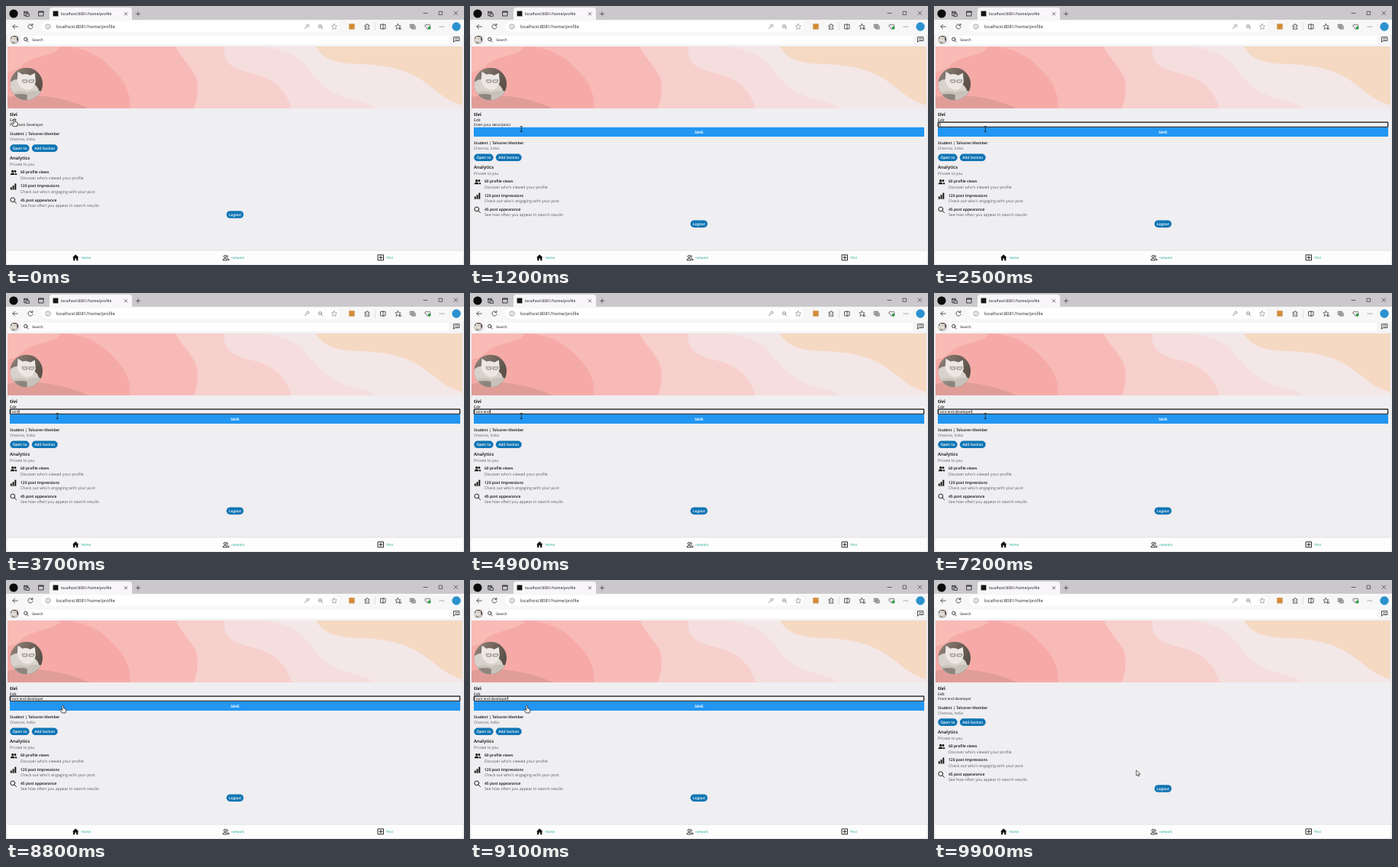
Write an HTML page with a canvas that moves like this. It is 600 by 339 pixels and loops after 10 s.

```html
<!DOCTYPE html>
<html lang="en">
<head>
<meta charset="utf-8">
<title>Profile page</title>
<style>
html, body { margin: 0; width: 100%; height: 100%; overflow: hidden; background: #e9e9ec; }
canvas, svg { position: absolute; left: 0; top: 0; width: 600px; height: 339px; }
text { font-family: "Open Sans", "Noto Sans", sans-serif; white-space: pre; text-rendering: geometricPrecision; }
</style>
</head>
<body>
<canvas id="stage"></canvas>
<svg id="over" viewBox="0 0 600 339"></svg>
<script>
const LOOP = 10000, SHIFT = 12.2;
const EDIT_AT = 500, FOCUS_AT = 1500, SAVE_AT = 9150;
const TYPED = "Front end developer";
const INK = "#0c0c0c", GREY = "#5c5c60", BLUE = "#0f75b4", PAGE = "#efeef1";

const canvas = document.getElementById("stage");
const svg = document.getElementById("over");
const ctx = canvas.getContext("2d");
const dpr = window.devicePixelRatio || 1;
canvas.width = 600 * dpr;
canvas.height = 339 * dpr;

// ---------- drawing helpers ----------
function rect(x, y, w, h, fill, r = 0) {
  ctx.beginPath();
  ctx.roundRect(x, y, w, h, r);
  ctx.fillStyle = fill;
  ctx.fill();
}
function disc(x, y, r, fill) {
  ctx.beginPath();
  ctx.arc(x, y, r, 0, 7);
  ctx.fillStyle = fill;
  ctx.fill();
}
function shape(d, fill) {
  ctx.fillStyle = fill;
  ctx.fill(new Path2D(d));
}
function line(x, y, d, w = 0.8, color = "#333") {
  ctx.save();
  ctx.translate(x, y);
  ctx.lineWidth = w;
  ctx.lineCap = ctx.lineJoin = "round";
  ctx.strokeStyle = color;
  ctx.stroke(new Path2D(d));
  ctx.restore();
}
function node(tag, attrs, parent = svg) {
  const el = document.createElementNS("http://www.w3.org/2000/svg", tag);
  for (const k in attrs) el.setAttribute(k, attrs[k]);
  parent.appendChild(el);
  return el;
}
function label(parent, x, y, str, size, fill = INK, weight = 400, anchor = "start") {
  const el = node("text", { x, y, fill, "font-size": size, "font-weight": weight, "text-anchor": anchor }, parent);
  el.textContent = str;
  return el;
}

// ---------- browser frame ----------
const STAR = "M0-3.6L1.1-1.2 3.6-1 1.7.8 2.3 3.4 0 2-2.3 3.4-1.7.8-3.6-1-1.1-1.2Z";
const LENS = "M1.8-.4a2.2 2.2 0 1 1-4.4 0a2.2 2.2 0 1 1 4.4 0M1.2 1.2L3.2 3.2";

function drawBrowser() {
  rect(0, 0, 600, 339, "#e9e9ec");
  rect(0, 0, 600, 18, "#cbc8cc");
  rect(0, 18, 600, 19, "#f7f7f8");
  rect(57, 2, 108, 17, "#f8f6f9", [4, 4, 0, 0]);
  rect(46, 20, 391, 13.5, "#fff", 6.5);

  disc(10, 10, 5.6, "#0b0b0c");
  line(27, 10, "M-3.2-2.6H1.6V0M-3.2-2.6V2.6H-1M-3.2-1.2H1.6M-.6.2H3.4V3.4H-.6Z", 0.9);
  line(46, 10, "M-3-3H3V3H-3Z", 0.9);
  line(46, 10, "M-3-2.3H3", 1.6);
  rect(61.6, 6.6, 6.8, 6.8, "#151515");
  line(157, 10.3, "M-1.7-1.7L1.7 1.7M1.7-1.7L-1.7 1.7", 0.7);
  line(173, 10.3, "M-2.7 0H2.7M0-2.7V2.7", 0.7);
  line(549.5, 9.5, "M-2.5 0H2.5", 0.7);
  line(569.5, 9.3, "M-2.1-2.1H2.1V2.1H-2.1Z", 0.7);
  line(589.3, 9.3, "M-2.2-2.2L2.2 2.2M2.2-2.2L-2.2 2.2", 0.7);

  line(12, 27, "M3.4 0H-3.2M-.4-2.8L-3.2 0-.4 2.8");
  line(32, 27, "M2.6-1.8A3.1 3.1 0 1 0 3.1.4M2.9-3.6V-1.5H.8");
  line(55, 27, "M3.2 0a3.2 3.2 0 1 1-6.4 0a3.2 3.2 0 1 1 6.4 0M0-.3V1.7M0-1.6V-1.5", 0.6, "#666");
  line(394, 27, "M3 -1.4a1.7 1.7 0 1 1-3.4 0a1.7 1.7 0 1 1 3.4 0M-.2 0L-2.8 2.6M-1.8 1.6L-.9 2.4", 0.65, "#777");
  line(412, 27, LENS + "M-1.5-.4H.7", 0.65, "#777");
  line(430, 27, STAR, 0.6, "#777");
  rect(449.3, 23.2, 7.4, 7.4, "#d58c3c");
  line(473, 27, "M-2.6-1.8H-.8a1.1 1.1 0 1 1 2 0H2.8V0a1.1 1.1 0 1 0 0 1.8V3.3H-2.6V1.8a1.1 1.1 0 1 0 0-1.8Z", 0.7);
  line(483.5, 27, "M0-4.5V4.5", 0.5, "#c8c8cc");
  line(494, 27, "M-3-2.8H3V2.8H-3ZM0-3.5V3.5", 0.8);
  line(513.5, 27, STAR + "M2.4 1.8H4.2M2 3.2H4.2", 0.7);
  line(533, 27, "M-3.2-2.8H1.4V1.4H-3.2ZM-1.6 3H3.2V-1M-.9-2V.6M-2.2-.7H.4", 0.7);
  line(552.5, 27, "M0 3L-3.2 0C-4.4-2-1.5-4.2 0-1.8 1.5-4.2 4.4-2 3.2 0Z", 0.8);
  disc(554.6, 28.8, 2, "#2e9b45");
  [-2.3, 0, 2.3].forEach(dx => disc(571 + dx, 27, 0.55, "#333"));
  disc(590, 27, 5.7, "#2b91cf");
}

// ---------- page ----------
function portrait(x, y, r) {
  ctx.save();
  ctx.translate(x, y);
  ctx.scale(r / 21, r / 21);
  ctx.beginPath();
  ctx.arc(0, 0, 21, 0, 7);
  ctx.clip();
  const g = ctx.createLinearGradient(-18, -16, 20, 8);
  g.addColorStop(0, "#8d8177");
  g.addColorStop(0.5, "#6d6158");
  g.addColorStop(1, "#584e47");
  rect(-21, -21, 42, 42, g);
  shape("M-21-2Q-14-8-8-5L10 0Q17 5 17 14L-21 17Z", "#d8d2cc");
  shape("M-12-4L-11-16-5-12Q0-14 5-11L11-14 12-3Q10 7 1 8-9 6-12-4Z", "#ece7e3");
  line(1, -4, "M-6-1H0V2H-5ZM3-1H9L8 2H3Z", 0.8, "#6c6460");
  shape("M-21 12Q-9 7 1 11 11 7 21 10V21H-21Z", "#c8c2bb");
  shape("M-21 15Q-8 11 1 14V21H-21Z", "#8d857c");
  ctx.restore();
}

function drawBanner() {
  ctx.save();
  ctx.beginPath();
  ctx.rect(2, 53, 596, 81);
  ctx.clip();
  rect(2, 53, 596, 81, "#f6aaa7");
  shape("M2 53H78C112 56 128 70 142 85 157 100 164 116 162 134H600V53Z", "#f8bab7");
  shape("M2 53H72C63 66 36 65 23 76 14 84 8 86 2 87Z", "#f8bbb5");
  shape("M222 53C229 68 246 82 250 97 253 110 250 122 246 134H600V53Z", "#f7cfcc");
  shape("M286 53C284 74 296 82 318 87 350 94 366 108 374 134H600V53Z", "#f5dedd");
  shape("M338 53C372 58 386 68 398 84 412 104 428 116 452 122 468 126 480 130 484 134H600V53Z", "#f4e7e8");
  shape("M406 53C415 70 434 75 460 76 500 77 524 83 546 98 566 112 578 126 600 130V53Z", "#f5d9c3");
  shape("M2 119C35 113 77 119 108 134H2Z", "#e09d98");
  ctx.restore();
}

function people(x, y, open) {
  if (open) {
    line(x, y, "M.3-1.7a1.6 1.6 0 1 1-3.2 0a1.6 1.6 0 1 1 3.2 0M-4 3V2Q-1.3-.2 1.3 2V3ZM1.2-3.2a1.6 1.6 0 0 1 0 3M2.2.8Q4 1.3 4 3H2.6", 0.8, "#111");
    return;
  }
  disc(x - 1.3, y - 1.5, 1.7, "#111");
  disc(x + 2, y - 1.5, 1.4, "#111");
  rect(x - 4.3, y + 0.7, 5.9, 2.4, "#111", [2, 2, 0, 0]);
  rect(x + 2.1, y + 0.7, 2.3, 2.4, "#111", [0, 2, 0, 0]);
}

function drawBody(dy) {
  ctx.save();
  ctx.translate(0, dy);
  rect(5.2, 181.3, 25.4, 9.6, BLUE, 4.8);
  rect(33.8, 181.3, 33.9, 9.6, BLUE, 4.8);
  rect(288.8, 268.2, 22.4, 9.6, BLUE, 4.8);
  people(10, 218);
  rect(5.8, 237.2, 1.9, 3.3, "#111");
  rect(8.6, 235, 1.9, 5.5, "#111");
  rect(11.4, 232.4, 1.9, 8.1, "#111");
  line(9.4, 254.2, "M2.3-.5a2.9 2.9 0 1 1-5.8 0a2.9 2.9 0 1 1 5.8 0M1.5 1.6L4.2 4.2", 0.9, "#111");
  ctx.restore();
}

function drawPage(editing, focused) {
  rect(1.5, 37, 597, 301, PAGE, 2);
  rect(1.5, 37, 597, 15.5, "#f5f5f7", 2);
  rect(20.5, 38.7, 560, 11.2, "#fff", 1.5);
  portrait(11, 44, 5.6);
  line(26.2, 43.8, LENS, 0.8, "#111");
  line(590.3, 43.4, "M-3.5-2.7H3.5V2.1H-1.8L-3.5 3.6Z", 0.8, "#222");
  line(590.3, 43.2, "M-1.8-.9H1.8M-1.8.7H1.8", 0.5, "#222");
  drawBanner();
  portrait(26.7, 102, 21.3);

  if (editing) {
    rect(5, 158.8, 590, 12.2, "#2196f3");
    if (focused) {
      rect(4.7, 151.6, 590.6, 7.2, "#101010", 1.4);
      rect(5.9, 152.7, 588.2, 5, "#f2f2f4", 0.6);
    }
  }
  drawBody(editing ? SHIFT : 0);

  rect(1.5, 320, 597, 18, "#fdfdfd", [0, 0, 3, 3]);
  rect(1.5, 319.6, 597, 0.7, "#d9d9dd");
  shape("M91.2 325.2L87 329.3H88.1V333.2H90.3V330.6H92.1V333.2H94.3V329.3H95.4Z", "#111");
  people(288.3, 329.5, true);
  line(491, 329.3, "M-3.5-3.5H3.5V3.5H-3.5ZM-2 0H2M0-2V2", 0.9, "#111");
}

// ---------- text ----------
label(svg, 72, 12.4, "localhost:8081/home/profile", 5.02, "#111");
label(svg, 65.8, 29.1, "localhost:8081/home/profile", 5.83, "#222");
label(svg, 34, 45.8, "Search", 4.65);
label(svg, 5, 144, "tivi", 6.1, INK, 700);
label(svg, 5, 150.8, "Edit", 4.95);
const desc = label(svg, 5, 157.3, "", 4.68);
const save = label(svg, 300, 166.7, "SAVE", 4.8, "#fff", 700, "middle");

const body = node("g", {});
label(body, 5, 168.7, "Student | Talvoren Member", 4.92, INK, 600);
label(body, 5, 175.8, "Chennai, India", 4.95, GREY);
label(body, 17.9, 187.9, "Open to", 4.9, "#fff", 600, "middle");
label(body, 50.8, 187.9, "Add Section", 4.75, "#fff", 600, "middle");
label(body, 5, 201.1, "Analytics", 6, INK, 600);
label(body, 5, 208.7, "Private to you", 5.05, GREY);
[
  ["60 profile views", "Discover who's viewed your profile"],
  ["120 post Impressions", "Check out who's engaging with your post"],
  ["45 post appearance", "See how often you appear in search results"]
].forEach(([head, sub], i) => {
  label(body, 19, 219.3 + i * 18.1, head, 5, INK, 600);
  label(body, 19, 226.8 + i * 18.1, sub, 5.15, GREY);
});
label(body, 300, 274.9, "Logout", 4.8, "#fff", 600, "middle");

[[98.5, "Home"], [295.2, "network"], [498.2, "Post"]].forEach(([x, s]) =>
  label(svg, x, 331, s, 4.45, "#10a68e"));

// ---------- caret and pointer ----------
const caret = node("rect", { y: 153, width: 0.7, height: 4.6, fill: "#111" });
const pointer = node("g", { "stroke-linejoin": "round", "stroke-linecap": "round" });
const HAND = "M-1 .9a1 1 0 0 1 2 0V3.7L3.2 4.1Q4.6 4.5 4.3 5.9L3.6 9.6H-1.2L-3.6 6.2Q-3.9 4.7-2.5 5L-1 6.2Z";
const cursors = {
  hand: node("path", { d: HAND, fill: "#fff", stroke: "#111", "stroke-width": 0.75 }, pointer),
  beam: node("path", { d: "M-1.4-3.3H1.4M-1.4 3.3H1.4M0-3.3V3.3", fill: "none", stroke: "#222", "stroke-width": 0.8 }, pointer),
  arrow: node("path", { d: "M0 0V6.7L1.6 5.3 2.6 7.7 3.8 7.2 2.8 4.8H4.8Z", fill: "#fff", stroke: "#111", "stroke-width": 0.65 }, pointer)
};
const TRACK = [
  [0, 11, 148], [500, 11, 148], [1100, 67.3, 161], [7900, 67.3, 161],
  [8450, 74.5, 164.3], [9200, 74.5, 164.3], [9850, 265, 249.3], [LOOP, 265, 249.3]
];

function pointerAt(t) {
  const i = TRACK.findIndex(k => t < k[0]);
  const [t0, x0, y0] = TRACK[i - 1], [t1, x1, y1] = TRACK[i];
  const u = (t - t0) / (t1 - t0), e = u * u * (3 - 2 * u);
  return [x0 + (x1 - x0) * e, y0 + (y1 - y0) * e];
}
function cursorKind(t) {
  if (t < 620) return "hand";
  if (t < 800) return "arrow";
  if (t < 8200) return "beam";
  return t < 9350 ? "hand" : "arrow";
}
function typedCount(t) {
  if (t < 2450) return 0;
  const n = t < 4770 ? 1 + Math.floor((t - 2450) / 290) : 9 + Math.floor((t - 4770) / 225);
  return Math.min(n, TYPED.length);
}
function caretOn(t) {
  if (t < 2450) return (t - FOCUS_AT) % 1000 < 500;
  return t < 7020 || (t - 7020) % 1000 < 500;
}
function show(el, on) {
  el.style.display = on ? "" : "none";
}

function render(t) {
  const editing = t >= EDIT_AT && t < SAVE_AT;
  const focused = editing && t >= FOCUS_AT;
  ctx.setTransform(dpr, 0, 0, dpr, 0, 0);
  drawBrowser();
  drawPage(editing, focused);

  const typed = TYPED.slice(0, typedCount(t));
  desc.textContent = t < EDIT_AT ? "Full Stack Developer"
    : !editing ? TYPED : typed || "Enter your description";
  show(save, editing);
  body.setAttribute("transform", `translate(0 ${editing ? SHIFT : 0})`);

  show(caret, focused && caretOn(t));
  caret.setAttribute("x", 5.2 + (typed ? desc.getComputedTextLength() : 0));

  const [x, y] = pointerAt(t);
  pointer.setAttribute("transform", `translate(${x} ${y})`);
  for (const k in cursors) show(cursors[k], k === cursorKind(t));
}

const start = performance.now();
function tick() {
  render((performance.now() - start) % LOOP);
  requestAnimationFrame(tick);
}
tick();
</script>
</body>
</html>
```
